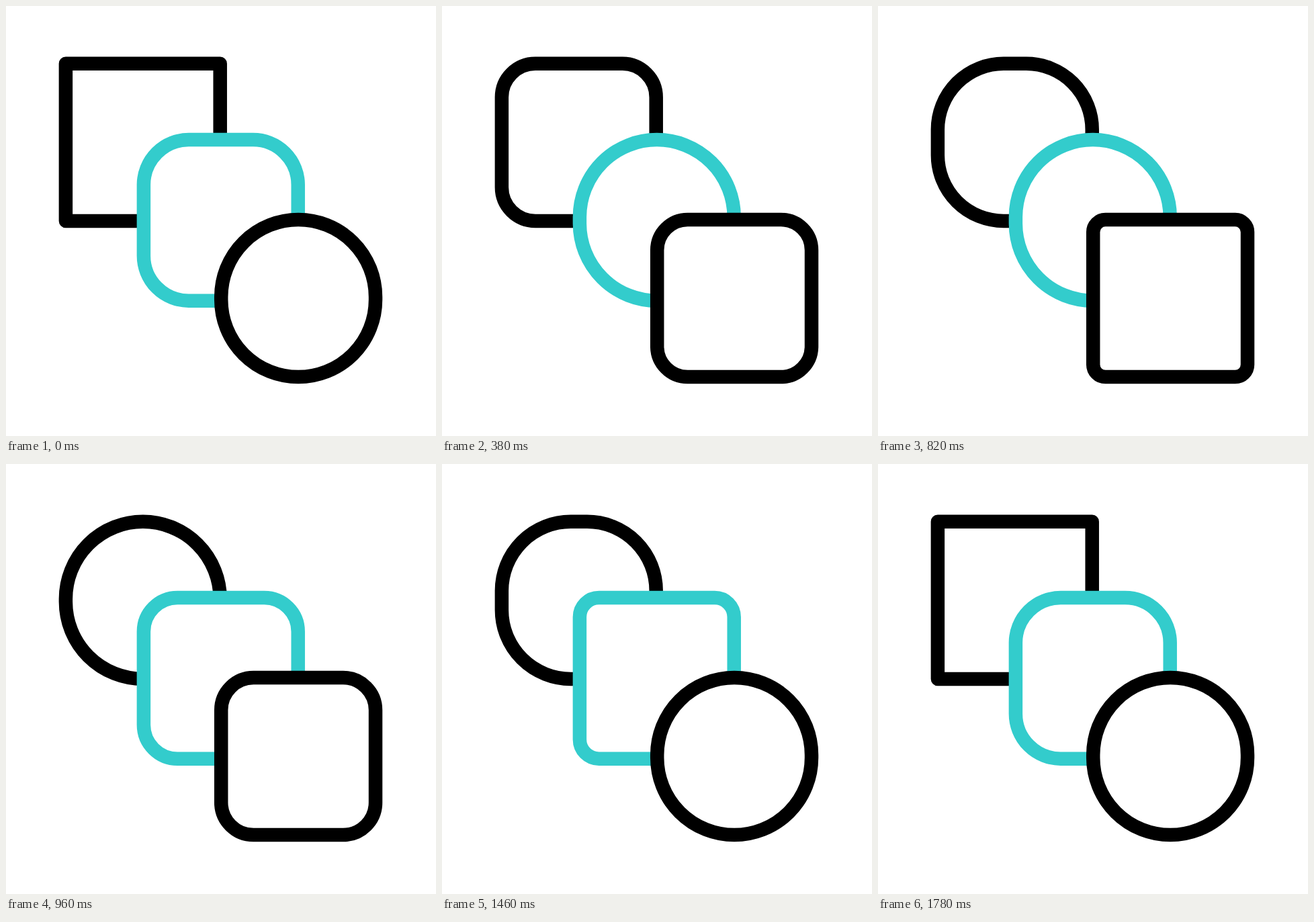
Write an HTML page that moves like this. It is 640x640 px and loops after 1800 ms.

```html
<!DOCTYPE html>
<html lang="en">
<head>
<meta charset="utf-8">
<title>Shape morph</title>
<style>
  html, body { margin: 0; width: 100%; height: 100%; overflow: hidden; background: #fff; }
  svg { display: block; width: 100%; height: 100%; }
  rect { fill: #fff; stroke: #000; stroke-width: 20.5; stroke-linejoin: round; }
  .accent { stroke: #33cccc; }
</style>
</head>
<body>
<svg viewBox="0 0 640 640">
  <rect x="88.9" y="85.8" width="229.8" height="234.1"/>
  <rect class="accent" x="204.9" y="199.1" width="229.8" height="239.6"/>
  <rect x="320.2" y="318" width="229.8" height="234.1"/>
</svg>
<script>
  const LOOP = 1800, TICK = 20, DELAY = 6, SPAN = 590;
  // Corner radii of the three states; the circle's overshoots and is clamped.
  const STATES = [0, 67, 180];
  const shapes = [...document.querySelectorAll('rect')];

  // cubic-bezier(.5, 0, .5, 1), solved by bisection
  function ease(x) {
    let lo = 0, hi = 1;
    for (let i = 0; i < 24; i++) {
      const s = (lo + hi) / 2;
      if (1.5 * s * (1 - s) + s ** 3 < x) lo = s; else hi = s;
    }
    return lo * lo * (3 - 2 * lo);
  }

  function draw(ms) {
    const t = Math.floor((ms % LOOP) / TICK) * TICK;
    const p = Math.min(Math.max((t - DELAY) / SPAN, 0), 3);
    const seg = Math.min(Math.floor(p), 2);
    const k = p === 3 ? 1 : ease(p - seg);
    shapes.forEach((el, i) => {
      const from = STATES[(seg + i) % 3];
      const to = STATES[(seg + i + 1) % 3];
      const half = Math.min(el.width.baseVal.value, el.height.baseVal.value) / 2;
      const r = Math.min(from + (to - from) * k, half).toFixed(2);
      el.setAttribute('rx', r);
      el.setAttribute('ry', r);
    });
  }

  const start = performance.now();
  function frame() {
    draw(performance.now() - start);
    requestAnimationFrame(frame);
  }
  frame();
</script>
</body>
</html>
```
